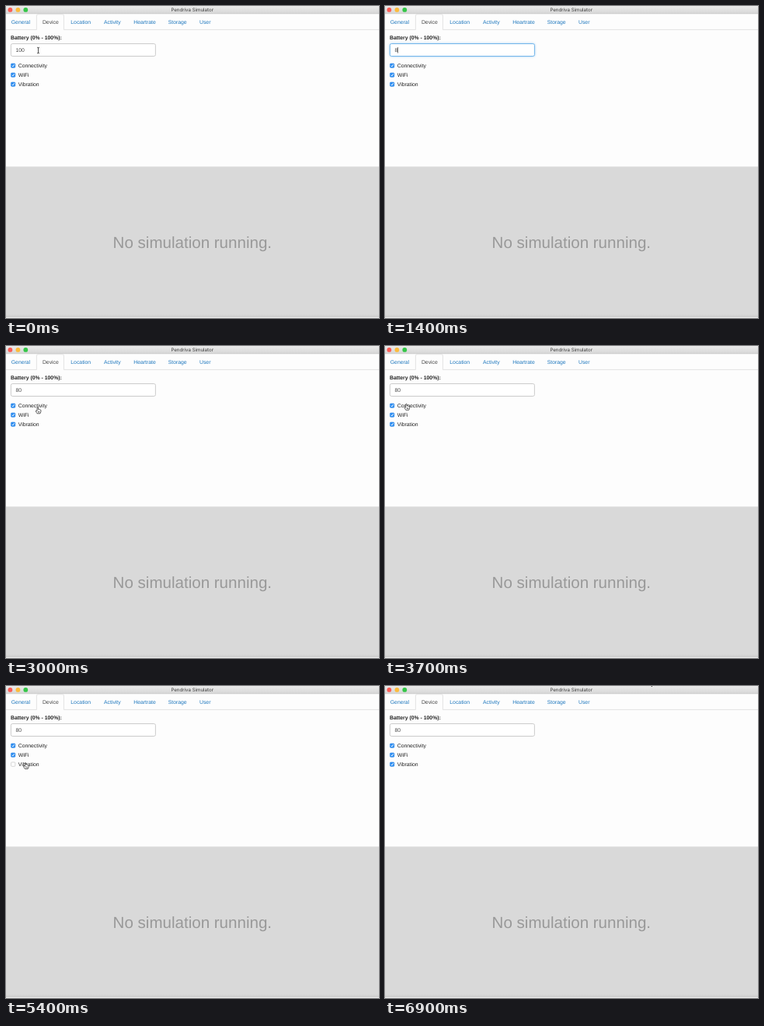
Animation of 480 by 401 pixels, one loop 7 s. Source, as an HTML page:

```html
<!DOCTYPE html>
<html lang="en">
<head>
<meta charset="utf-8">
<title>Device settings</title>
<style>
  html, body { margin: 0; width: 100%; height: 100%; overflow: hidden; background: #fdfdfd; }
  svg { display: block; width: 100%; height: 100%; }
  text { font: 6.85px "Liberation Sans", Arial, sans-serif; fill: #222; text-rendering: geometricPrecision; white-space: pre; }
  .title { font: 6.15px Inter, sans-serif; text-anchor: middle; fill: #3a3a3a; }
  .label { font-weight: bold; }
  .tab { fill: #1f78be; }
  .tab.active, .value { fill: #484848; }
  .status { font-size: 20.55px; text-anchor: middle; fill: #999; }
  .field { fill: #fff; stroke: #c6c6c6; }
  .focus .field { stroke: #66afe9; filter: drop-shadow(0 0 1.5px #66afe999); }
  .box { fill: #fff; stroke: #bdbdbd; stroke-width: .6; }
  .tick { fill: none; stroke: none; stroke-width: .95; }
  .on .box { fill: #2f8ff2; stroke: #2581e4; }
  .on .tick { stroke: #fff; }
</style>
</head>
<body>
<svg viewBox="0 0 480 401" preserveAspectRatio="none">
  <defs>
    <linearGradient id="bar" x2="0" y2="1">
      <stop stop-color="#ebebeb"/><stop offset="1" stop-color="#d6d6d6"/>
    </linearGradient>
    <linearGradient id="edge" x2="0" y2="1">
      <stop stop-color="#d9d9d9"/><stop offset="1" stop-color="#cbcbcb"/>
    </linearGradient>
  </defs>
  <rect width="480" height="401" fill="#fdfdfd"/>
  <rect width="480" height="10" fill="url(#bar)"/>
  <rect y="9.6" width="480" height=".6" fill="#c4c4c4"/>
  <circle cx="5.4" cy="4.9" r="2.9" fill="#fb5d57"/>
  <circle cx="15.4" cy="4.9" r="2.9" fill="#fcbc3d"/>
  <circle cx="25.3" cy="4.9" r="2.9" fill="#34c648"/>
  <text class="title" x="239.7" y="7.2">Pendriva Simulator</text>

  <path d="M0 30.4H39.4V12.5q0-1.8 1.8-1.8H72.6q1.8 0 1.8 1.8V30.4H480" fill="none" stroke="#dcdcdc" stroke-width=".8"/>
  <g id="tabs"></g>

  <text class="label" x="6" y="43.4">Battery (0% - 100%):</text>
  <g id="input">
    <rect class="field" x="6.4" y="48.5" width="186" height="16" rx="2" stroke-width=".9"/>
    <text class="value" id="value" x="12.4" y="59"></text>
    <path id="caret" d="M0 53V60.5" stroke="#333" stroke-width=".7"/>
  </g>
  <g id="checks"></g>

  <rect y="206.4" width="480" height="194.6" fill="#d9d9d9"/>
  <text class="status" x="239.8" y="310.6">No simulation running.</text>
  <rect y="396" width="480" height="4" fill="url(#edge)"/>
  <rect y="400" width="480" height="1" fill="#f0f0f0"/>

  <g id="cursor">
    <path id="beam" d="M-1.4-3.8Q0-3.8 0-2.9Q0-3.8 1.4-3.8M0-3V3M-1.4 3.8Q0 3.8 0 2.9Q0 3.8 1.4 3.8" fill="none" stroke="#222" stroke-width=".8"/>
    <path id="arrow" d="M0 0V6.1L1.4 4.8L2.5 7.2L3.5 6.8L2.5 4.4H4.4Z" fill="#000" stroke="#fff" stroke-width=".5" paint-order="stroke"/>
    <path id="hand" d="M-.7 4.8V.4Q0-.6.7.4V2.6Q1.5 2 2 2.9Q2.8 2.4 3.2 3.3Q4.2 3 4.2 4.2V5.5L3.2 8H-.7L-2.4 5.2Q-2.5 4-1.5 4.2ZM.8 5V6.8M2.2 5V6.8" fill="#fff" stroke="#111" stroke-width=".65" stroke-linejoin="round"/>
  </g>
</svg>
<script>
const $ = id => document.getElementById(id);
const LOOP = 7000, STEP = 100;

const tabs = { General: 6.8, Device: 46.9, Location: 83.3, Activity: 126, Heartrate: 164.2, Storage: 208.7, User: 249 };
$('tabs').innerHTML = Object.entries(tabs).map(([name, x]) =>
  `<text class="tab${name === 'Device' ? ' active' : ''}" x="${x}" y="22.8">${name}</text>`).join('');

// Each option is unchecked between its two times.
const options = [
  { name: 'Connectivity', off: 3300, on: 3600 },
  { name: 'WiFi', off: 4400, on: 4900 },
  { name: 'Vibration', off: 5300, on: 5600 }
];
$('checks').innerHTML = options.map(({ name }, i) =>
  `<g transform="translate(6.5 ${74 + i * 12})">
    <rect class="box" width="5.3" height="5.3" rx="1"/>
    <path class="tick" d="M1.2 2.8L2.3 4L4.1 1.2"/>
    <text x="9.2" y="5.1">${name}</text>
  </g>`).join('');

const typed = [[0, '100'], [800, '10'], [900, '1'], [1000, ''], [1300, '8'], [1500, '80']];
const shapes = [[0, 'beam'], [800, ''], [1700, 'beam'], [1900, 'arrow'], [3000, 'hand'], [5800, 'arrow']];
const path = [
  [0, 41.5, 57], [1700, 41.5, 57], [2200, 112.3, 103], [2700, 112.3, 103],
  [3100, 27.5, 74.3], [3900, 27.5, 74.3], [4300, 23, 86.8], [5000, 23, 86.8],
  [5200, 25, 98.5], [5700, 25, 98.5], [6000, 109, 90.2], [6300, 109, 90.2], [6900, 340.5, -6.3]
];

const latest = (list, t) => list.filter(([at]) => at <= t).pop()[1];

function position(t) {
  const i = path.findIndex(([at]) => at > t);
  if (i < 0) return path[path.length - 1].slice(1);
  const [t0, x0, y0] = path[i - 1], [t1, x1, y1] = path[i];
  const p = (t - t0) / (t1 - t0), k = p * p * (3 - 2 * p);
  return [x0 + (x1 - x0) * k, y0 + (y1 - y0) * k];
}

function draw(t) {
  const text = latest(typed, t), focused = t >= 400 && t < 2200;
  $('value').textContent = text;
  $('input').setAttribute('class', focused ? 'focus' : '');
  $('caret').setAttribute('visibility', focused ? 'visible' : 'hidden');
  $('caret').setAttribute('transform', `translate(${12.7 + text.length * 3.81} 0)`);
  options.forEach(({ off, on }, i) =>
    $('checks').children[i].setAttribute('class', t >= off && t < on ? '' : 'on'));
  const shape = latest(shapes, t);
  for (const el of $('cursor').children)
    el.setAttribute('visibility', el.id === shape ? 'visible' : 'hidden');
  $('cursor').setAttribute('transform', `translate(${position(t)})`);
}

const start = performance.now();
function tick() {
  const t = (performance.now() - start) % LOOP;
  draw(Math.floor(t / STEP) * STEP);
  requestAnimationFrame(tick);
}
tick();
</script>
</body>
</html>
```
